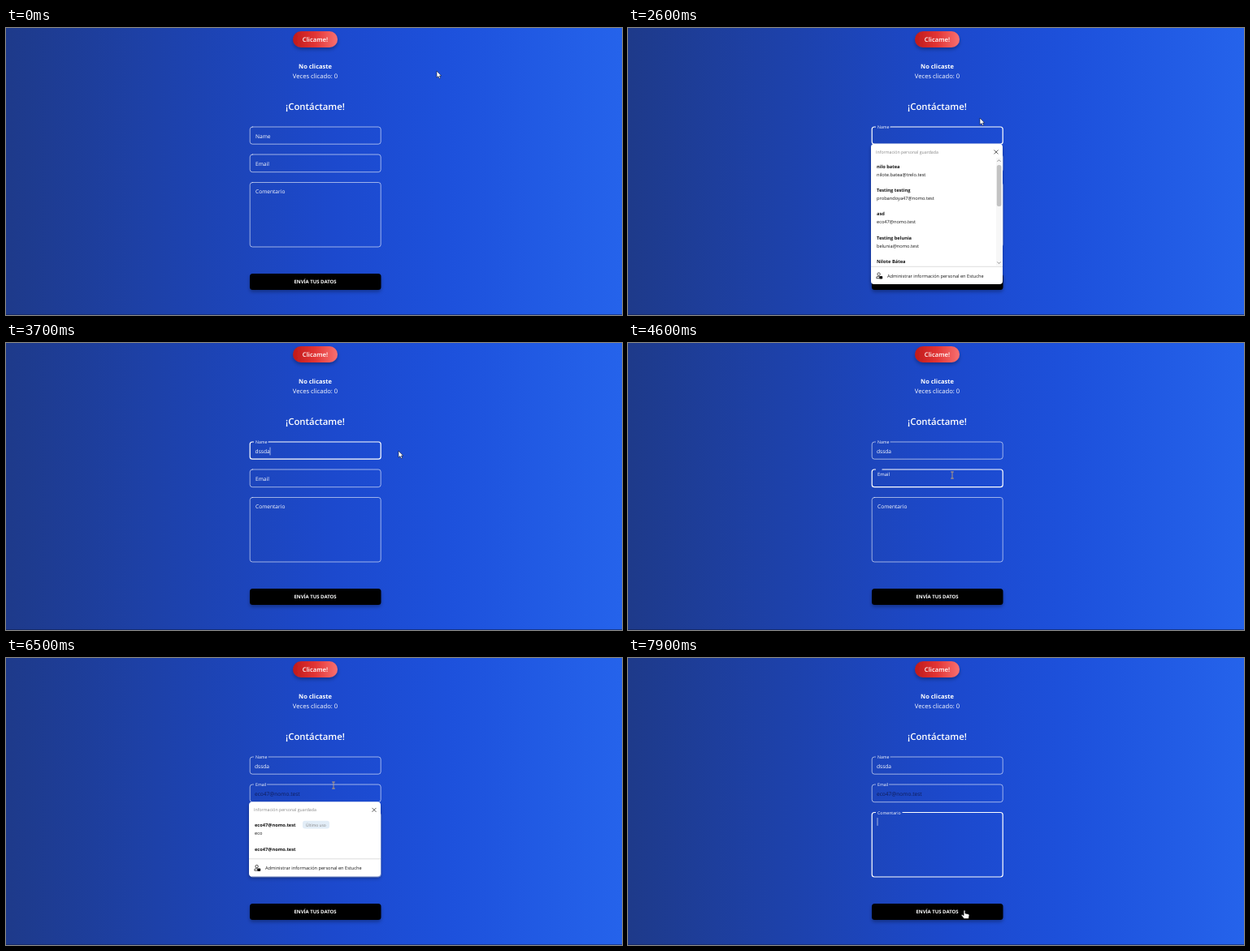
Animation of 758 by 354 pixels, one loop 8000 ms. Source, as an HTML page:

```html
<!DOCTYPE html>
<html lang="es">
<head>
<meta charset="utf-8">
<title>Formulario de contacto</title>
<style>
  html, body { margin: 0; width: 100%; height: 100%; overflow: hidden; background: #1d4ed8; }
  svg { display: block; width: 100vw; height: 100vh; }
  text { font-family: "Open Sans", "Noto Sans", sans-serif; fill: #fff; text-rendering: geometricPrecision; white-space: pre; }
  .mid { text-anchor: middle; }
  .bold { font-weight: 700; }
  .semi { font-weight: 600; }
  .ink { fill: #161616; }
  .grey { fill: #858585; }
  .filled { fill: #101d58; }
  .line { fill: none; stroke-linecap: round; stroke-linejoin: round; }
</style>
</head>
<body>
<svg viewBox="0 0 758 354" xmlns="http://www.w3.org/2000/svg">
  <defs>
    <linearGradient id="sky">
      <stop offset="0" stop-color="#1e3a8a"/>
      <stop offset=".53" stop-color="#1c49cd"/>
      <stop offset=".72" stop-color="#1d51dc"/>
      <stop offset="1" stop-color="#2563eb"/>
    </linearGradient>
    <linearGradient id="red">
      <stop offset="0" stop-color="#c01a1a"/>
      <stop offset=".5" stop-color="#e23535"/>
      <stop offset="1" stop-color="#f87171"/>
    </linearGradient>
    <filter id="soft" x="-20%" y="-40%" width="140%" height="200%">
      <feDropShadow dx="0" dy="2.5" stdDeviation="2" flood-color="#000" flood-opacity=".3"/>
    </filter>
  </defs>
  <rect width="758" height="354" fill="url(#sky)"/>
  <rect y="353" width="758" height="1" fill="#101c4a" opacity=".55"/>
  <rect x="353" y="4" width="55" height="20" rx="10" fill="url(#red)" filter="url(#soft)"/>
  <text class="mid semi" x="380.5" y="17" font-size="7.7">Clicame!</text>
  <text class="mid bold" x="380.5" y="49.6" font-size="7.5">No clicaste</text>
  <text class="mid" x="380.5" y="61.6" font-size="7.65">Veces clicado: 0</text>
  <text class="mid semi" x="380.5" y="101.4" font-size="11.4">¡Contáctame!</text>
  <rect x="300" y="303" width="161.5" height="20" rx="3.5" fill="#000" filter="url(#soft)"/>
  <text class="mid bold" x="380.5" y="315.3" font-size="6">ENVÍA TUS DATOS</text>
  <g id="live"></g>
</svg>
<script>
const LOOP = 8000, STEP = 100;
const live = document.getElementById('live');

const fields = [
  { label: 'Name', top: 122, bottom: 143.2, notch: 323, focus: 1800, blur: 4600,
    typed: [[3100, 'd'], [3300, 'ds'], [3400, 'dss'], [3600, 'dssd'], [3700, 'dssda']], caretX: 325 },
  { label: 'Email', top: 156, bottom: 177.7, notch: 321.5, focus: 4600, blur: 5900,
    typed: [[4800, 'ec'], [4900, 'eco'], [5900, 'eco47@nomo.test']], caretX: 318, autofill: 5900 },
  { label: 'Comentario', top: 190.5, bottom: 270, notch: 338, focus: 6900, blur: LOOP, typed: [], caretX: 307 }
];

// Visible spans of the blinking caret
const carets = [[1900, 2400], [2900, 3100], [3200, 4100], [4700, 5400], [7000, 7500], [7900, 8000]];

const people = [
  ['nilo batea', 'nilote.batea@trelo.test'],
  ['Testing testing', 'probandoya47@nomo.test'],
  ['asd', 'eco47@nomo.test'],
  ['Testing belunia', 'belunia@nomo.test'],
  ['Nilote Bátea', '']
];
const mails = ['eco47@nomo.test', 'ecolu47@nomo.test', 'ecota47@nomo.test', 'eco@nomo.test'];

const menus = [
  { from: 2000, to: 3100, top: 143, height: 173, people: true },
  { from: 4700, to: 4900, top: 177.5, height: 173, people: true },
  { from: 4900, to: 5900, top: 177.5, height: 149, count: 4 },
  { from: 6100, to: 6600, top: 177.5, height: 92, count: 1 }
];

// time, x, y
const path = [
  [0, 530, 53], [200, 528, 55], [500, 497, 84], [900, 412, 149], [1100, 378, 137], [1200, 386, 133],
  [2300, 386, 133], [2600, 433, 111], [3000, 470, 119], [3200, 476, 124], [3700, 483, 133],
  [4000, 483, 133], [4300, 400, 165], [4600, 399, 163], [4900, 399, 160], [5500, 399, 160],
  [5800, 352, 210], [5900, 352, 210], [6200, 403, 157], [6500, 403, 157], [6700, 530, 178],
  [6900, 432, 215], [7300, 402, 226], [7400, 402, 226], [7800, 414, 311], [7900, 414, 311]
];

const mix = (a, b, p) => a + (b - a) * p;
const ease = p => p * p * (3 - 2 * p);
const clamp = p => Math.max(0, Math.min(1, p));
const text = (x, y, size, words, cls = '') =>
  `<text x="${x}" y="${y}" font-size="${size}" class="${cls}">${words}</text>`;
const line = (d, color, width) =>
  `<path class="line" d="${d}" stroke="${color}" stroke-width="${width}"/>`;
const box = (x, y, w, h, r, fill, extra = '') =>
  `<rect x="${x}" y="${y}" width="${w}" height="${h}" rx="${r}" fill="${fill}" ${extra}/>`;

function drawField(f, t) {
  const { top, bottom } = f, left = 300.2, right = 461.2, r = 3;
  const focused = t >= f.focus && t < f.blur;
  const p = ease(clamp((t - f.focus + STEP) / 200));
  const start = p > 0 ? mix(304.5, f.notch, p) : left + r;
  const end = p > 0 ? `H304.5` : 'Z';
  const d = `M${start} ${top}H${right - r}q${r} 0 ${r} ${r}V${bottom - r}q0 ${r} ${-r} ${r}` +
    `H${left + r}q${-r} 0 ${-r} ${-r}V${top + r}q0 ${-r} ${r} ${-r}${end}`;
  let out = line(d, focused ? '#fff' : 'rgba(255,255,255,.72)', focused ? 1.2 : 0.8);
  out += text(307, mix(top + 13.7, top + 2.2, p), mix(6.6, 5.2, p), f.label);

  const value = f.typed.filter(([at]) => t >= at).pop();
  if (value) {
    const cls = f.autofill && t >= f.autofill ? 'filled' : '';
    out += text(focused ? 306.6 : 306, top + 13.5, 6.6, value[1], cls);
  }
  if (focused && carets.some(([a, b]) => t >= a && t < b)) {
    const x = value ? f.caretX : 307;
    out += line(`M${x} ${top + 7}v9`, '#fff', 0.6);
  }
  return out;
}

function drawPeople(top) {
  let out = people.map(([name, mail], i) => {
    const y = top + 30 + i * 29.2;
    return text(306, y, 5.7, name, 'bold ink') + text(306, y + 10, 5.7, mail, 'ink');
  }).join('');
  out += box(453, top + 17, 7, 133, 0, '#f7f7f7') + box(453.8, top + 26, 5.6, 51, 2.5, '#c3c3c3');
  out += line(`M454.7 ${top + 21.5}l1.8 -1.8l1.8 1.8M454.7 ${top + 145.8}l1.8 1.8l1.8 -1.8`, '#777', 0.8);
  return out;
}

function drawMails(top, count) {
  let out = text(306, top + 30, 5.7, mails[0], 'bold ink') + text(306, top + 40.4, 5.7, 'eco', 'ink');
  out += box(365, top + 23.3, 33, 9.8, 3, '#e2edf7') + text(369, top + 30, 4.9, 'Último uso', 'grey');
  for (let i = 0; i < count; i++)
    out += text(306, top + 60.5 + i * 19.2, 5.7, mails[i], 'bold ink');
  return out;
}

function drawMenu(m) {
  const { top, height } = m, foot = top + height;
  let out = box(299, top, 162, height, 4, '#fff', 'filter="url(#soft)"');
  out += text(305, top + 11.8, 5.22, 'Información personal guardada', 'grey');
  out += line(`M450.8 ${top + 7.7}l4.4 4.4m0 -4.4l-4.4 4.4`, '#333', 0.8);
  out += m.people ? drawPeople(top) : drawMails(top, m.count);
  out += line(`M299.5 ${foot - 21.7}H460.5`, '#cfcfcf', 0.7);
  out += `<circle cx="308.6" cy="${foot - 12.4}" r="1.7" fill="none" stroke="#222" stroke-width=".8"/>`;
  out += line(`M309 ${foot - 7.3}h-3.2v-1q0 -1.3 1.3 -1.3h2`, '#222', 0.8);
  out += box(309.2, foot - 10, 4, 3.6, 0.8, '#111');
  return out + text(319, foot - 8.4, 5.64, 'Administrar información personal en Estuche', 'ink');
}

function cursorAt(t) {
  const i = path.findIndex(k => k[0] > t);
  if (i < 0) return path[path.length - 1].slice(1);
  const [a, b] = [path[i - 1], path[i]], p = (t - a[0]) / (b[0] - a[0]);
  return [mix(a[1], b[1], p), mix(a[2], b[2], p)];
}

function drawCursor(t, menu) {
  const [x, y] = cursorAt(t);
  const inside = (top, bottom) => x > 300 && x < 461 && y >= top && y <= bottom;
  const covered = menu && inside(menu.top, menu.top + menu.height);
  const place = shape => `<g transform="translate(${x} ${y})">${shape}</g>`;
  if (!covered && fields.some(f => inside(f.top, f.bottom)))
    return place(line('M-1.5 -4h3M0 -4V4M-1.5 4h3', '#d2ad72', 0.8));
  if (inside(303, 323))
    return place('<path d="M-.9 .8Q0 -.8 .9 .8V4l4 .9q1 .3 1 1.4l-.8 4.2H-.5L-3.7 6.5q.2 -1.4 1.5 -.8l1.3 1Z" ' +
      'fill="#fff" stroke="#111" stroke-width=".6" stroke-linejoin="round"/>');
  return place('<path d="M0 0V8.2L1.9 6.5L3.2 9.3L4.6 8.7L3.4 6H5.7Z" fill="#fff" stroke="#0b1533" stroke-width=".6"/>');
}

function render(now) {
  const t = Math.floor(now % LOOP / STEP) * STEP;
  const menu = menus.find(m => t >= m.from && t < m.to);
  live.innerHTML = fields.map(f => drawField(f, t)).join('') + (menu ? drawMenu(menu) : '') + drawCursor(t, menu);
}

const begin = performance.now();
function tick() {
  render(performance.now() - begin);
  requestAnimationFrame(tick);
}
tick();
</script>
</body>
</html>
```
